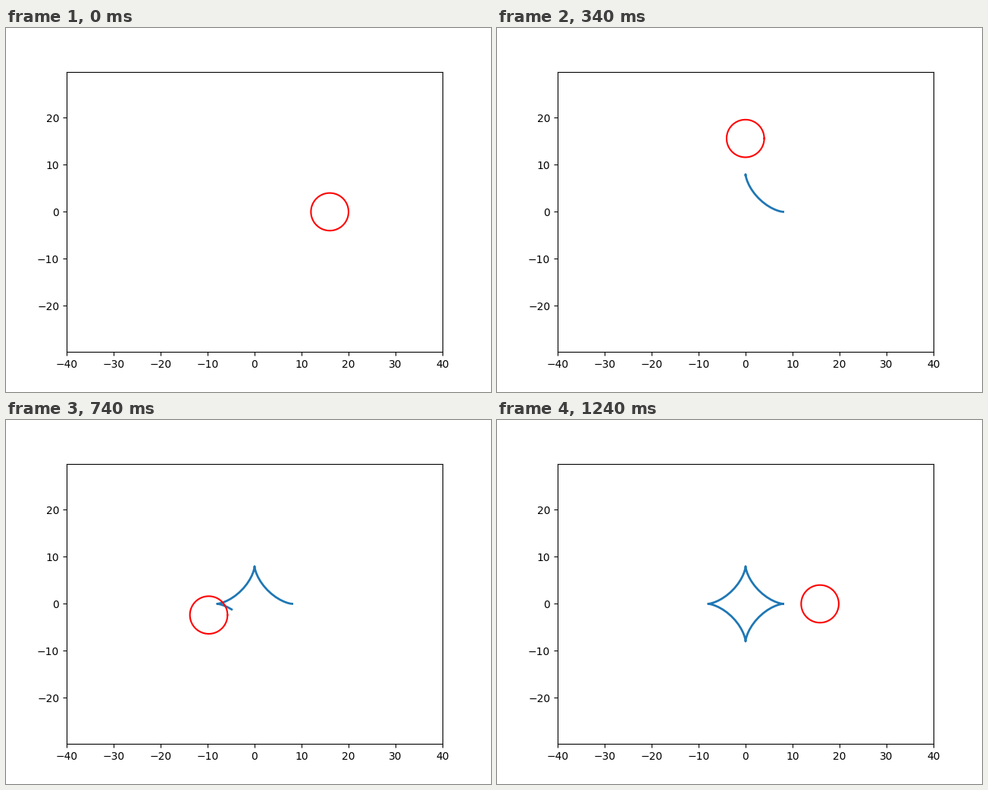
Animation, 640 px wide and 480 px high, one loop 1260 ms. Source, as a matplotlib script:

```python
import numpy as np
import matplotlib.pyplot as plt
from matplotlib.animation import FuncAnimation

FRAMES = 63
STEP = 0.1
RADIUS = 4

fig, ax = plt.subplots(figsize=(6.4, 4.8), dpi=100)
ax.set_xlim(-40, 40)
half_height = 40 * 369.6 / 496  # equal scale on both axes
ax.set_ylim(-half_height, half_height)

trace, = ax.plot([], [], lw=2)
ring, = ax.plot([], [], "r", lw=1.5)

angle = np.linspace(0, 2 * np.pi, 100)
ring_x, ring_y = RADIUS * np.cos(angle), RADIUS * np.sin(angle)


def astroid(t, size):
    return size * np.cos(t) ** 3, size * np.sin(t) ** 3


def draw(i):
    t = STEP * np.arange(i + 1)
    trace.set_data(*(astroid(t, 8) if i else ([], [])))
    cx, cy = astroid(t[-1], 16)
    ring.set_data(cx + ring_x, cy + ring_y)
    return trace, ring


anim = FuncAnimation(fig, draw, frames=FRAMES, interval=20, repeat=True)
plt.show()
```
